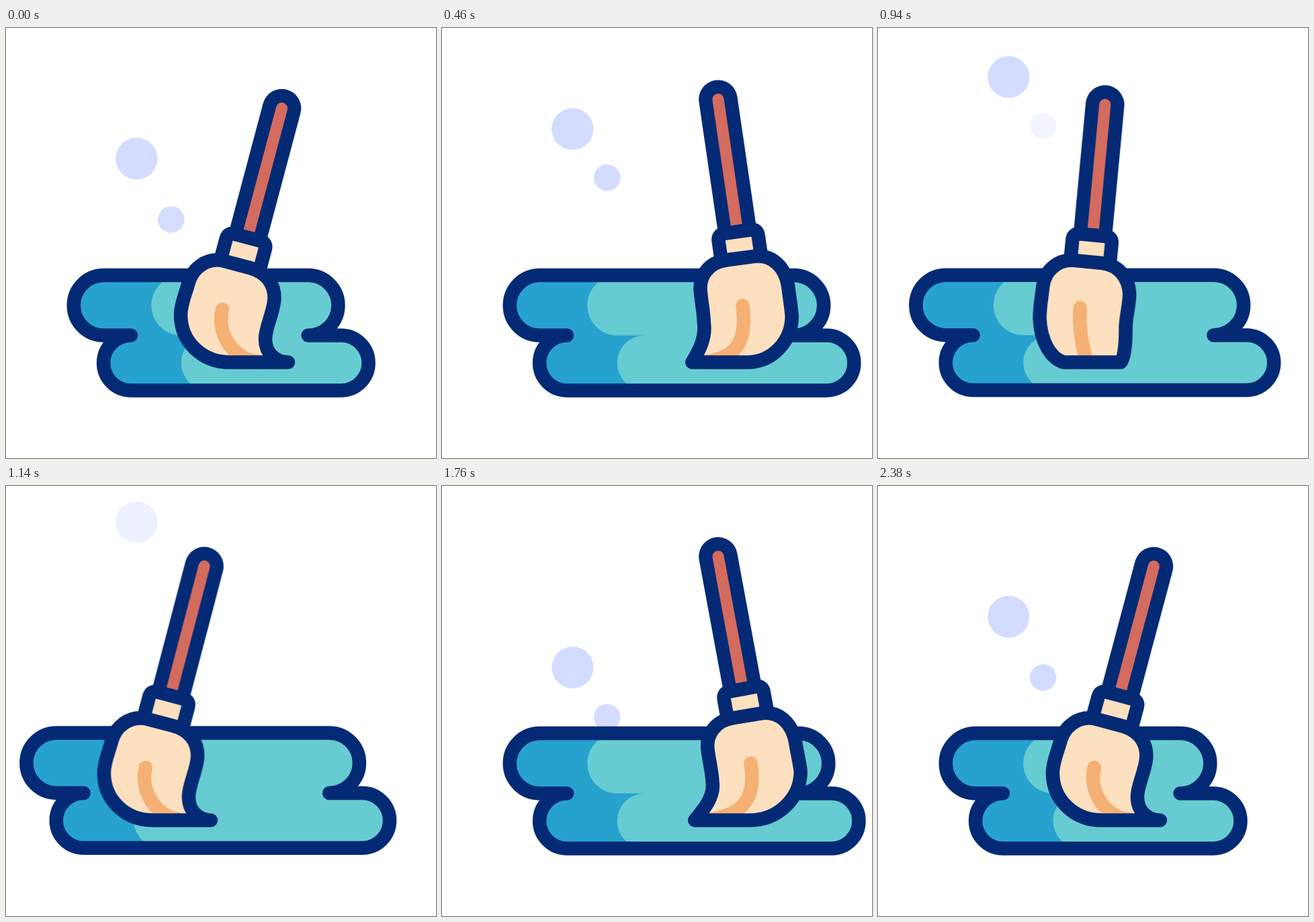
Animation of 640 by 640 pixels, one loop 2400 ms. Source, as an HTML page:

```html
<!DOCTYPE html>
<html lang="en">
<head>
<meta charset="utf-8">
<title>Paint brush</title>
<style>
  html, body { margin: 0; height: 100%; overflow: hidden; background: #fff; }
  svg { display: block; width: 100%; height: 100%; }

  :root { --navy: #042a75; --peach: #fce0bf; --sweep: cubic-bezier(.5, 0, .5, 1); }
  path { fill: none; stroke-width: 20.5; stroke-linejoin: round; }
  .line { stroke: var(--navy); }
  .skin { fill: var(--peach); }

  /* --a: rest pose, --b: swung right, --c: swung left (defaults to rest) */
  .morph { d: var(--a); animation: morph 2.4s var(--sweep) infinite; }
  .slide { animation: slide 2.4s var(--sweep) infinite; }
  @keyframes morph {
    0%, 96.6%, 100% { d: var(--a); }
    25%, 26.04%, 72.6% { d: var(--b); }
    49.4%, 50.8% { d: var(--c, var(--a)); }
  }
  @keyframes slide {
    0%, 25%, 26.04%, 72.6%, 100% { transform: translateX(0); }
    49.4%, 50.8% { transform: translateX(-116.5px); }
  }

  .bubble { fill: #d3dcff; animation: 2.4s cubic-bezier(.333, 0, .667, 1) infinite, 2.4s linear infinite; }
  .big { animation-name: bigRise, bigFade; }
  .small { animation-name: smallRise, smallFade; }
  @keyframes bigRise {
    0%, 100% { transform: translateY(0); }
    52.1% { transform: translateY(-143.5px); }
    55% { transform: translateY(119px); }
  }
  @keyframes bigFade {
    0%, 43.75%, 66.7%, 100% { opacity: 1; }
    50.4%, 59.6% { opacity: 0; }
  }
  @keyframes smallRise {
    0%, 95.8%, 100% { transform: translateY(0); }
    41.67% { transform: translateY(-141px); }
    62.5% { transform: translateY(79px); }
  }
  @keyframes smallFade {
    0%, 35%, 71%, 100% { opacity: 1; }
    41%, 64% { opacity: 0; }
  }

  .paint {
    --a: path("M186 457.6H145.5A44.75 44.75 0 0 1 145.5 368.1H449.7A44.75 44.75 0 0 1 449.7 457.6H498.7A40.9 40.9 0 0 1 498.7 539.4H186A40.9 40.9 0 0 1 186 457.6Z");
    --b: path("M186 457.6H145.5A44.75 44.75 0 0 1 145.5 368.1H530.7A44.75 44.75 0 0 1 530.7 457.6H579.7A40.9 40.9 0 0 1 579.7 539.4H186A40.9 40.9 0 0 1 186 457.6Z");
    --c: path("M115 456.9H74.5A44.75 44.75 0 0 1 74.5 367.4H480.7A44.75 44.75 0 0 1 480.7 456.9H529.7A40.9 40.9 0 0 1 529.7 538.7H115A40.9 40.9 0 0 1 115 456.9Z");
  }
  .light {
    fill: #66ccd1;
    --a: path("M301.5 457.6H261A44.75 44.75 0 0 1 261 368.1H449.7A44.75 44.75 0 0 1 449.7 457.6H498.7A40.9 40.9 0 0 1 498.7 539.4H301.5A40.9 40.9 0 0 1 301.5 457.6Z");
    --b: path("M301.5 457.6H261A44.75 44.75 0 0 1 261 368.1H530.7A44.75 44.75 0 0 1 530.7 457.6H579.7A40.9 40.9 0 0 1 579.7 539.4H301.5A40.9 40.9 0 0 1 301.5 457.6Z");
    --c: path("M230.5 456.9H190A44.75 44.75 0 0 1 190 367.4H480.7A44.75 44.75 0 0 1 480.7 456.9H529.7A40.9 40.9 0 0 1 529.7 538.7H230.5A40.9 40.9 0 0 1 230.5 456.9Z");
  }
  .handle {
    stroke-linecap: round;
    --a: path("M410.5 119.5L359.2 312.2");
    --b: path("M411 104.9L447.7 302.6");
  }
  .ferrule {
    --a: path("M319.5 344L327.6 313.9Q330.2 304 340.1 306.6L378.5 316.9Q388.4 319.6 385.7 329.4L377.6 359.6");
    --b: path("M425.5 348.4L419.9 317.8Q418 307.7 428 305.9L467.2 298.6Q477.2 296.8 479 306.8L484.7 337.5");
  }
  .head {
    --a: path("M320 345.7C297 343 278 358 272 378C268 394 260 410 260 427C260 467 292 497.5 333 497.5L420 497.5C400 497.5 386 483 386 463C386 445 398 425 399.5 403C400 380 386 363 363 357Z");
    --b: path("M432.4 345.5C408 349.5 392.6 369 395.8 393C397.7 409 402.2 425 402.7 441C406 461.6 390.4 480.7 376.2 497.5L457.8 497.5C500.5 497.5 534 464.6 534 425C532.5 411.5 528.8 397 526.5 382.5C522 354 502.8 335 476.5 338Z");
  }
  .shade {
    stroke: #f5b074;
    --a: path("M322 419C313 452 336 497.5 385 497.5");
    --b: path("M459.8 412.5C466.5 455 459 492.6 385 497.5");
  }
  .cap { stroke-linecap: round; }
</style>
</head>
<body>
<svg viewBox="0 0 640 640">
  <circle class="bubble big" cx="194.4" cy="194.4" r="31.1"/>
  <circle class="bubble small" cx="245.7" cy="285" r="19.7"/>

  <path class="morph paint" style="fill: #27a2ce"/>
  <path class="morph light"/>
  <path class="morph paint line"/>

  <g class="slide">
    <path class="morph handle line" style="stroke-width: 57.6"/>
    <path class="morph handle" style="stroke: #d46b5f; stroke-width: 17.2"/>
    <path class="morph ferrule skin line"/>
    <path class="morph head skin"/>
    <path class="morph shade cap"/>
    <path class="morph head line"/>
  </g>
</svg>
</body>
</html>
```
